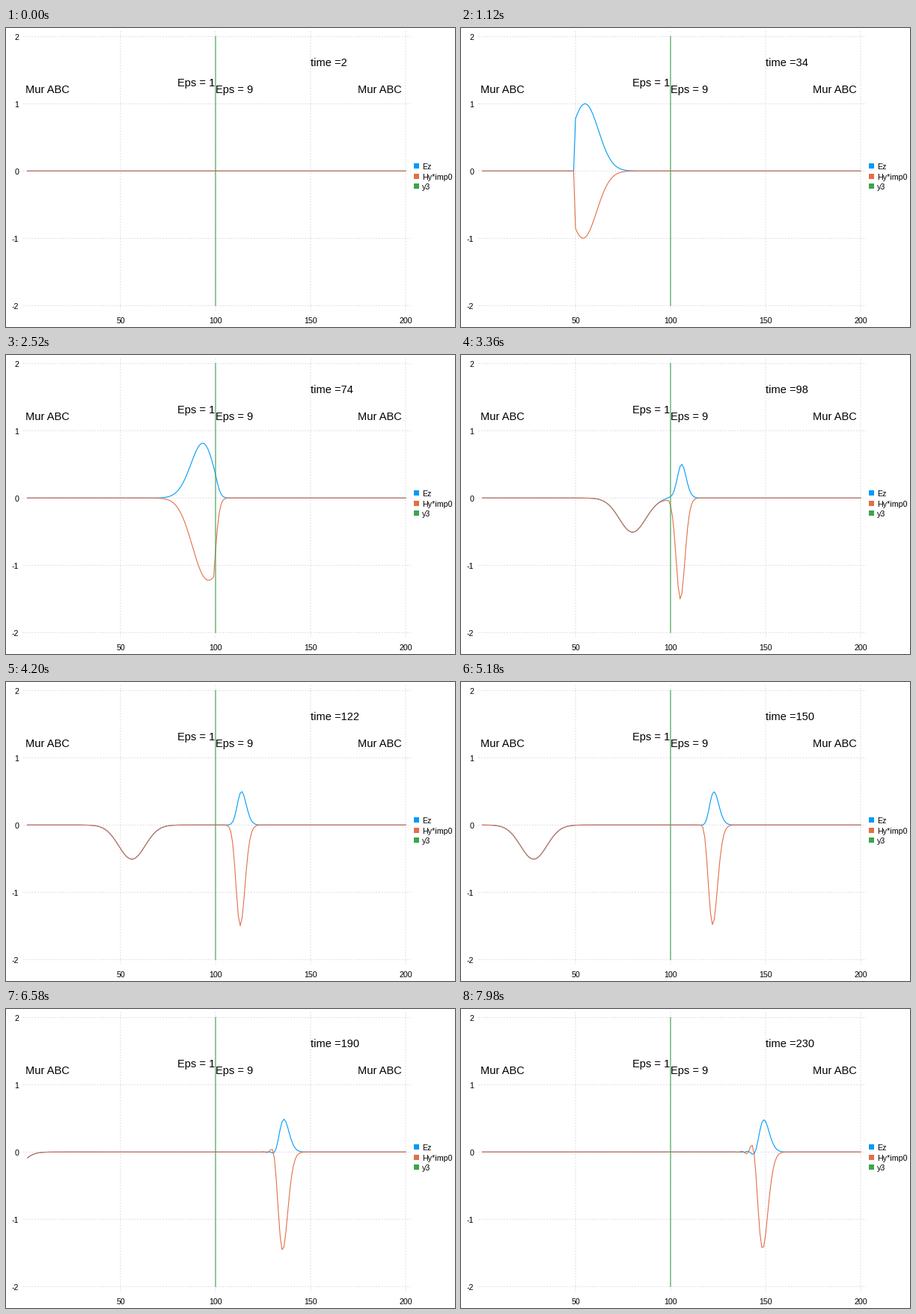
Recreate the animation shown at these times as a matplotlib script. Size 600 px wide and 400 px high, loop 8000 ms.

```python
import numpy as np
import matplotlib.pyplot as plt
from matplotlib.animation import FuncAnimation
from matplotlib.patches import Rectangle

DPI = 100
PT = 72 / DPI                     # points per pixel
BLUE, ORANGE, GREEN, GRID = "#009af9", "#e26f46", "#3da44d", "#d0d0e0"

LOOP, TICK, STEP = 8000, 20, 70   # ms
SIZE, SOURCE, SLAB = 200, 50, 100
CELLS = np.arange(1, SIZE + 1)


def px(x):
    return 26 + 2.54 * x


def py(y):
    return 191.3 - 90 * y


def pulse(t):
    return np.exp(-((t - 30) ** 2) / 100)


def simulate(last):
    """1D FDTD run: a pulse enters at SOURCE and meets a dielectric slab."""
    ez, hy = np.zeros(SIZE), np.zeros(SIZE)   # hy is scaled by the impedance
    eps = np.where(CELLS < SLAB, 1.0, 9.0)
    s = 1 / 3
    mur = (s - 1) / (s + 1)
    history = [(ez.copy(), hy.copy())]
    for t in range(1, last + 1):
        hy[:-1] += np.diff(ez)
        hy[SOURCE - 2] -= pulse(t)
        left, right, edge = ez[1], ez[-2], ez[-1]
        ez[1:-1] += np.diff(hy[:-1]) / eps[1:-1]
        ez[SOURCE - 1] += pulse(t + 1)
        ez[0] = left
        ez[-1] = right + mur * (ez[-2] - edge)
        history.append((ez.copy(), hy.copy()))
    return history


history = simulate(2 + 2 * (LOOP // STEP))

plt.rcParams["font.family"] = "Liberation Sans"
fig = plt.figure(figsize=(600 / DPI, 400 / DPI), dpi=DPI, facecolor="white")
ax = fig.add_axes([0, 0, 1, 1])
ax.set_xlim(0, 600)
ax.set_ylim(400, 0)
ax.axis("off")


def line(xs, ys, color, width, **kw):
    return ax.plot(xs, ys, color=color, lw=width * PT, snap=False, **kw)[0]


def label(x, y, text, size=10.67, ha="left"):
    return ax.text(x, y, text, fontsize=size * PT, ha=ha, va="baseline", color="black")


def note(x, y, text):
    return label(px(x), py(y) + 3.7, text, 14.67)


dots = dict(linestyle=(0, (2.5, 2.5)), dash_capstyle="butt")
for v in range(-2, 3):
    line([23, 541], [py(v)] * 2, GRID, 0.76, **dots)
    label(17, py(v) + 4.5, str(v), ha="right")
for v in range(50, 201, 50):
    line([px(v)] * 2, [4, 378], GRID, 0.76, **dots)
    label(px(v), 395, str(v), ha="center")

ez_line = line(px(CELLS), py(0 * CELLS), BLUE, 1.1)
hy_line = line(px(CELLS), py(0 * CELLS), ORANGE, 1.1)
line([px(SLAB)] * 2, [py(2), py(-2)], GREEN, 1.1)

for i, (name, color) in enumerate([("Ez", BLUE), ("Hy*imp0", ORANGE), ("y3", GREEN)]):
    y = 184.3 + 13.8 * i
    ax.add_patch(Rectangle((545, y - 3.5), 7, 7, color=color, lw=0))
    label(556, y + 4.5, name)

note(0, 1.2, "Mur ABC")
note(80, 1.3, "Eps = 1")
note(100, 1.2, "Eps = 9")
note(175, 1.2, "Mur ABC")
clock = note(150, 1.6, "")


def draw(i):
    t = 2 + 2 * ((i * TICK + TICK // 2) // STEP)
    ez, hy = history[t]
    ez_line.set_ydata(py(ez))
    hy_line.set_ydata(py(hy))
    clock.set_text(f"time ={t}")
    return ez_line, hy_line, clock


anim = FuncAnimation(fig, draw, frames=LOOP // TICK, interval=TICK,
                     repeat=True, repeat_delay=0, blit=False)
plt.show()
```
